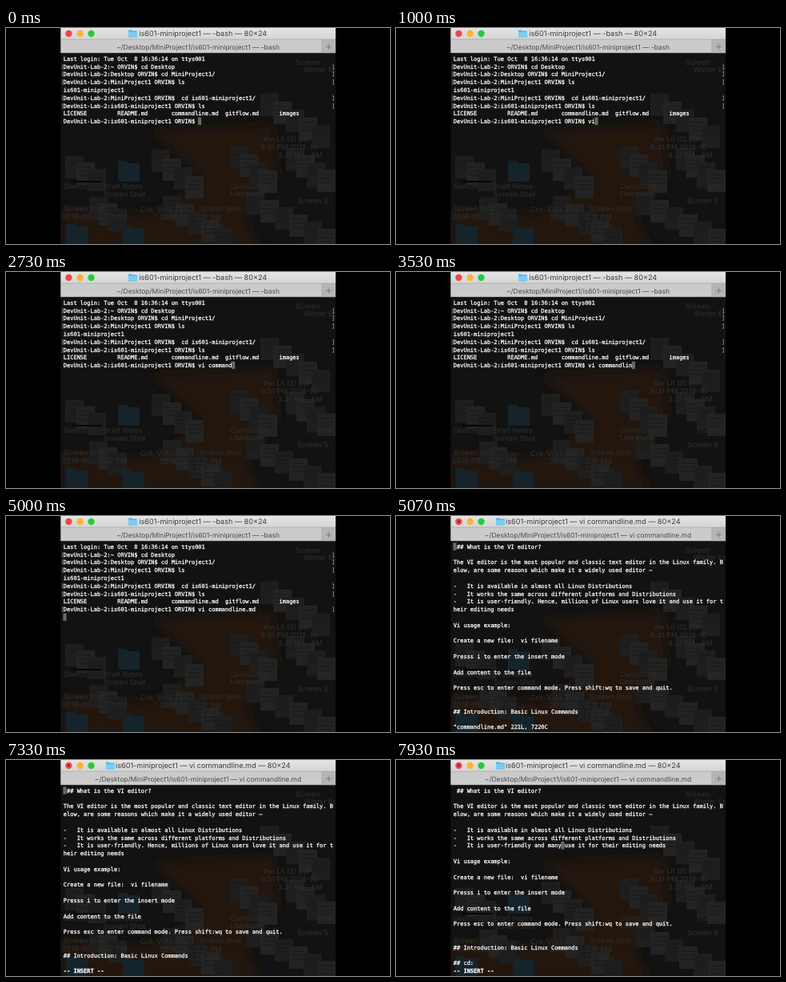
Animation of 480x270 px, one loop 8000 ms. Source, as an HTML page:

```html
<!DOCTYPE html>
<html lang="en">
<head>
<meta charset="utf-8">
<title>Terminal session</title>
<style>
  html, body { margin: 0; width: 100%; height: 100%; overflow: hidden; background: #000; }
  svg { display: block; width: 100%; height: 100%; }
  text { text-rendering: geometricPrecision; }
  .ui { font-family: Inter, Roboto, sans-serif; text-anchor: middle; }
  .mono { font: 7px "DejaVu Sans Mono", monospace; fill: #fff; stroke: #fff; stroke-width: .26; }
  .desk { font: 500 9px Inter, sans-serif; fill: #2d2c2b; }
</style>
</head>
<body>
<svg id="stage" viewBox="0 0 480 270" xmlns="http://www.w3.org/2000/svg">
  <defs>
    <linearGradient id="bar" x1="0" y1="0" x2="0" y2="1">
      <stop offset="0" stop-color="#e6e6e6"/><stop offset="1" stop-color="#d4d4d4"/>
    </linearGradient>
    <clipPath id="win"><rect x="68.3" y="-3" width="343.7" height="276" rx="3"/></clipPath>
    <filter id="soft"><feGaussianBlur stdDeviation=".6"/></filter>
    <filter id="haze"><feGaussianBlur stdDeviation="7"/></filter>
  </defs>
  <rect width="480" height="270" fill="#000"/>
  <g clip-path="url(#win)">
    <rect x="68" y="31" width="344" height="239" fill="#121212"/>
    <path d="M180 128L335 120 340 185 300 240 320 275 68 275V225L180 232 250 190z" fill="#20150d" filter="url(#haze)"/>
    <g id="desk" filter="url(#soft)"></g>
    <rect x="68" y="-1" width="344" height="15.5" fill="url(#bar)"/>
    <rect x="68" y="14" width="344" height="17.2" fill="#cbcbcb"/>
    <rect x="394.8" y="14" width="18" height="17.2" fill="#b5b5b5"/>
    <path d="M68 14.2H412M394.8 14V31" stroke="#a9a9a9" stroke-width=".7"/>
    <path d="M399.8 23.3h7M403.3 19.8v7" stroke="#707070" stroke-width=".8"/>
    <circle cx="78.4" cy="7" r="4.2" fill="#f0464a"/>
    <circle id="dot" cx="78.4" cy="7" r="1.4" fill="#7d1a16"/>
    <circle cx="92.6" cy="7" r="4.2" fill="#fcb42c"/>
    <circle cx="106.5" cy="7" r="4.2" fill="#28cb3b"/>
    <g id="folder">
      <path d="M0 3.2q0-.7.7-.7h3.2l1 1.1h5.2q.7 0 .7.7v7q0 .7-.7.7H.7q-.7 0-.7-.7z" fill="#57b5e2"/>
      <path d="M0 5h10.8v6.3q0 .7-.7.7H.7q-.7 0-.7-.7z" fill="#79cdf3"/>
    </g>
    <text id="title" class="ui" x="246.3" y="10" font-size="9.1" fill="#3c3c3c"></text>
    <text id="tab" class="ui" x="240" y="26.5" font-size="8.44" fill="#4a4a4a"></text>
    <rect id="cursor" width="4.2" height="9.4" fill="#686868"/>
    <g id="screen" class="mono"></g>
  </g>
</svg>
<script>
const LOOP = 8000, COLS = 4.214, ROWS = 9.8, LEFT = 71.8, TOP = 33.4;
const ENTER = 4870, OPEN = 5070, INSERT = 6930, EDIT = 7730;
const $ = id => document.getElementById(id);

function add(parent, tag, attrs, str) {
  const el = document.createElementNS('http://www.w3.org/2000/svg', tag);
  for (const k in attrs) el.setAttribute(k, attrs[k]);
  if (str) el.textContent = str.replace(/ /g, '\u00a0');
  parent.appendChild(el);
  return el;
}

// Dim desktop behind the translucent window: stacks of documents, folders, labels
function stack(x, y, count, dx, dy) {
  for (let i = 0; i < count; i++, x += dx, y += dy) {
    add($('desk'), 'rect', { x, y, width: 23, height: 28, fill: i % 2 ? '#232323' : '#1e1e1e' });
    add($('desk'), 'path', { d: `M${x + 3} ${y + 6}h17m0 5h-17m0 5h14`, stroke: '#191919', fill: 'none' });
  }
}
stack(318, 82, 5, 16, 10);
stack(182, 152, 4, 14, 11);
stack(280, 148, 4, 12, 10);
stack(350, 150, 4, 13, 9);
stack(74, 160, 3, 14, 8);
stack(104, 212, 3, 12, 7);
stack(196, 210, 5, 16, 10);
stack(300, 206, 6, 18, 9);
for (const [x, y] of [[140, 166], [75, 245], [146, 247]])
  add($('desk'), 'path', { d: `M${x} ${y}h10l3 3h14v23h-27z`, fill: '#15232b' });
add($('desk'), 'path', { d: 'M83 192h37', stroke: '#050505', 'stroke-width': 2 });
const labels = [
  [362, 46, 'Screen'], [372, 55, 'Winter Edu'], [322, 142, 'the Lit (2).pdf'],
  [318, 152, '9:31 PM 2018-10'], [340, 162, '3.31 PM   AM'], [72, 201, 'Sketch'],
  [122, 201, 'Draft Notes'], [122, 211, 'Screen Shot'], [280, 201, 'Curriculum'],
  [280, 210, 'Literature'], [376, 201, 'Invoice'], [364, 219, 'Screen S'],
  [72, 229, 'Screen Shot'], [70, 239, '2018-05-...0.17 PM'], [168, 230, 'Crit, Vi Fr The'],
  [242, 229, 'Screen Shot'], [192, 240, '2018-11-...2.17 PM'], [238, 250, '(1).docx']
];
for (const [x, y, s] of labels) add($('desk'), 'text', { x, y, class: 'desk' }, s);

const cellX = c => LEFT + c * COLS, cellY = r => TOP + r * ROWS;
const write = (g, row, str, more) => add(g, 'text', { x: cellX(0), y: cellY(row) + 7.4, ...more }, str);

function mark(g, row) {
  const y = cellY(row) + 7.4;
  add(g, 'text', { x: 68.6, y, opacity: .45 }, '[');
  add(g, 'text', { x: 407, y, opacity: .5 }, ']');
}

const host = 'DevUnit-Lab-2:', user = ' ORVIN$ ', repo = 'is601-miniproject1';
const prompt = dir => host + dir + user;
const here = prompt(repo);
const shellLines = [
  'Last login: Tue Oct  8 16:36:14 on ttys001',
  prompt('~') + 'cd Desktop',
  prompt('Desktop') + 'cd MiniProject1/',
  prompt('MiniProject1') + 'ls',
  repo,
  prompt('MiniProject1') + ' cd ' + repo + '/',
  here + 'ls',
  ['LICENSE', 'README.md', 'commandline.md', 'gitflow.md', 'images'].map(s => s.padEnd(16)).join('').trimEnd()
];

const intro = [
  ' ## What is the VI editor?', '',
  'The VI editor is the most popular and classic text editor in the Linux family. B',
  'elow, are some reasons which make it a widely used editor –', '',
  '-   It is available in almost all Linux Distributions',
  '-   It works the same across different platforms and Distributions'
];
const rest = [
  '', 'Vi usage example:', '', 'Create a new file:  vi filename', '',
  'Presss i to enter the insert mode', '', 'Add content to the file', '',
  'Press esc to enter command mode. Press shift:wq to save and quit.', '', '',
  '## Introduction: Basic Linux Commands'
];
const before = [...intro,
  '-   It is user-friendly. Hence, millions of Linux users love it and use it for t',
  'heir editing needs', ...rest];
const after = [...intro,
  '-   It is user-friendly and many use it for their editing needs', ...rest, '', '## cd:'];

function page(lines) {
  const g = add($('screen'), 'g', {});
  lines.forEach((s, i) => s && write(g, i, s));
  return g;
}
const shell = page(shellLines), viOld = page(before), viNew = page(after);
[1, 2, 3, 5, 6].forEach(r => mark(shell, r));
const input = write(shell, 8, here);
const entered = add($('screen'), 'g', {});
mark(entered, 8);
const info = write($('screen'), 23, '"commandline.md" 221L, 7220C');
const mode = write($('screen'), 23, '-- INSERT --', { 'font-weight': 700 });

const command = 'vi commandline.md';
const keys = [470, 730, 1070, 1530, 1670, 1800, 2000, 2330, 2530, 2730, 2870, 2970, 3070, 3730, 3870, 4070, 4330];

const show = (el, on) => el.setAttribute('visibility', on ? 'visible' : 'hidden');
function setText(el, s) { if (el.textContent !== s) el.textContent = s; }

function render(t) {
  const vi = t >= OPEN, edited = t >= EDIT, sent = t >= ENTER;
  const typed = keys.filter(k => k <= t).length;
  const job = vi ? command : '-bash';
  setText($('title'), `${repo} — ${job} — 80×24`);
  setText($('tab'), `~/Desktop/MiniProject1/${repo} — ${job}`);
  $('folder').setAttribute('transform', `translate(${vi ? 125 : 153} 0)`);
  show($('dot'), vi);
  setText(input, (here + command.slice(0, typed)).replace(/ /g, '\u00a0'));
  show(shell, !vi);
  show(entered, sent && !vi);
  show(viOld, vi && !edited);
  show(viNew, edited);
  show(info, vi && t < INSERT);
  show(mode, t >= INSERT);
  const [col, row] = edited ? [32, 7] : vi ? [0, 0] : sent ? [0, 9] : [here.length + typed, 8];
  $('cursor').setAttribute('x', cellX(col) - .4);
  $('cursor').setAttribute('y', cellY(row));
}

const start = performance.now();
function tick() {
  render((performance.now() - start) % LOOP);
  requestAnimationFrame(tick);
}
tick();
</script>
</body>
</html>
```
